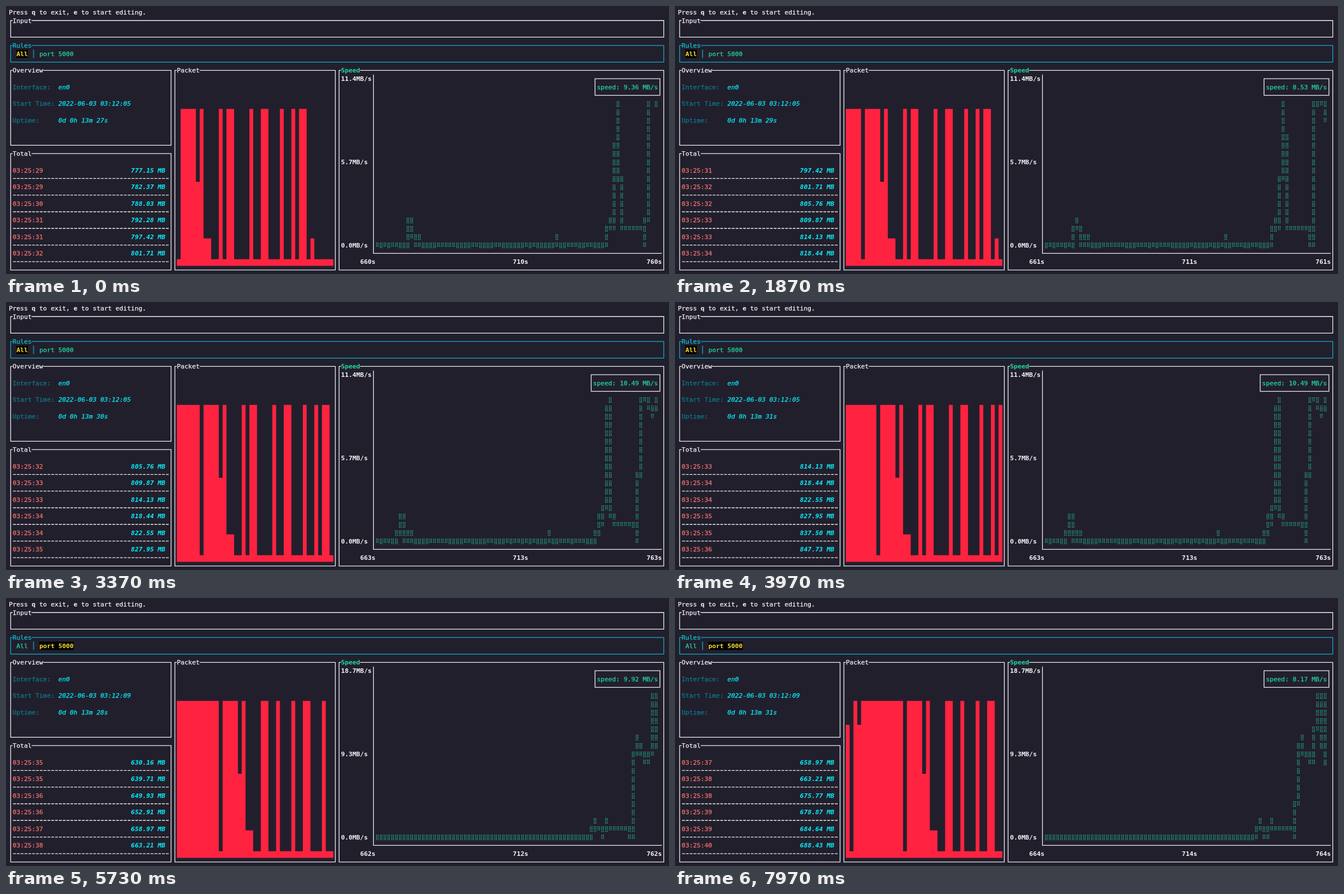
An HTML page for the animation above (8 s loop, 1177x476 px).

```html
<!DOCTYPE html>
<html lang="en">
<head>
<meta charset="utf-8">
<title>Packet monitor</title>
<style>
  html, body { margin: 0; width: 100%; height: 100%; overflow: hidden; background: #221f2d; }
  svg { display: block; width: 1177px; height: 476px; }
  text {
    font: 11.26px "DejaVu Sans Mono", monospace; white-space: pre;
    color: #f4f4f6; fill: currentColor; stroke: currentColor; stroke-width: .25;
  }
  .b { font-weight: bold; stroke-width: 0; }
  .i { font-style: italic; }
  .green { color: #21d9a4; }
  .cyan { color: #0cc6d8; }
  .label { color: #0a7c8b; }
  .value { color: #08effa; }
  .time { color: #f8726c; }
  .on { color: #fbdd33; }
  .line { fill: none; stroke: #ececef; stroke-width: 1.3; }
  .rules { stroke: #10aebf; }
  .dash { stroke-dasharray: 5 1.78; }
  .bars { fill: #ff2340; }
  .dots { fill: #21d3a0; }
  .bg { fill: #221f2d; }
  .black { fill: #000; }
</style>
</head>
<body>
<svg id="screen" viewBox="0 0 1177 476"></svg>
<script>
const LOOP = 8000, SWITCH = 5100, TICK = 535, STEP = 1042;
const CW = 6.78, RH = 14.77;
const X = col => 4.9 + col * CW;
const Y = row => 11 + row * RH;
const MX = col => X(col + .5);

// Terminal drawing helpers, all in columns and rows
const text = (c, r, s, cls = '') =>
  `<text x="${X(c)}" y="${Y(r) + 4}" class="${cls}">${s}</text>`;
const patch = (c, r, n, cls = 'bg') =>
  `<rect x="${X(c)}" y="${Y(r) - RH / 2}" width="${n * CW}" height="${RH}" class="${cls}"/>`;
const path = (d, cls = '') => `<path d="${d}" class="line ${cls}"/>`;
const frame = (c0, r0, c1, r1, cls) =>
  path(`M${MX(c0)} ${Y(r0)}H${MX(c1)}V${Y(r1)}H${MX(c0)}Z`, cls);
const box = (c0, r0, c1, r1, title, cls = '', lineCls = '') =>
  frame(c0, r0, c1, r1, lineCls) + patch(c0 + 1, r0, title.length) + text(c0 + 1, r0, title, cls);

// Packet sizes, newest first: full, medium, half, brief, tiny; height in rows
const HEIGHT = { F: 18.87, m: 16, h: 10.1, b: 3.3, '.': .8 };
const recent = 'm.Fm' + 'F'.repeat(11) + '.FFFFhF';
const allPackets = recent + 'bb..F.FF....F..FF...F..F.FF.b.....';
const portPackets = recent + 'bb..FF..F...F..FF...F...';

// MB received at each tick, from five ticks before the start
const received = [
  777.15, 782.37, 788.03, 792.28, 797.42, 801.71, 805.76, 809.87, 814.13, 818.44, 822.55,
  827.954, 837.504, 847.726, 850.706, 856.766, 861.006, 873.566, 876.666, 882.436, 886.226
];

// MB/s by second: what the port carries, and what else is on the wire
const noise = t => { const v = Math.sin(t * 127.1) * 43758.5; return v - Math.floor(v); };
const run = (start, ...vals) => t => vals[t - start] ?? 0;
const onset = run(742, .8, 1.85, 1.3, 1.3, .5, 1.8);
const burst = run(756, .35, 9, 10.9, 9.8, 9.36, 8.53, 8.75, 10.49, 18.68, 9.92, 15.93, 8.17);
const bump = run(672, 1.55, 1.8, .5, .5, .65);
const blip = run(724, .5, .55);
const spike = run(745, 4.75, 10.8);
const portSpeed = t => t > 747 && t < 756 ? 1.25 : onset(t) + burst(t);
const allSpeed = t => Math.max(portSpeed(t), bump(t) + blip(t) + spike(t), .4 * noise(t));
const between = (f, t) => {
  const a = Math.floor(t);
  return f(a) + (f(a + 1) - f(a)) * (t - a);
};

// The port tab started later, so its clock and its sum lag behind
const tabs = [
  { packets: allPackets, speed: allSpeed, offset: 0, lag: 0, start: 5, phase: 0, base: 760 },
  { packets: portPackets, speed: portSpeed, offset: 197.796, lag: 3, start: 9.05, phase: 4288, base: 661 + 100 }
];
const clock = n => 32.125 + n * TICK / 1000;

function rules(active) {
  const item = (c, s, on) => (on ? patch(c, 5, s.length, 'black') : '') + text(c, 5, s, on ? 'on b' : 'green');
  return item(2, 'All', !active) + item(8, 'port 5000', active) +
    path(`M${MX(6)} ${Y(4.5)}V${Y(5.5)}`, 'rules');
}

function overview(tab, n) {
  return [
    ['Interface:', 'en0'],
    ['Start Time:', '2022-06-03 03:12:0' + Math.floor(tab.start)],
    ['Uptime:', `0d 0h 13m ${Math.floor(clock(n) - tab.start)}s`]
  ].map(([k, v], i) => text(1, 9 + 2 * i, k, 'label') + text(13, 9 + 2 * i, v, 'value i')).join('');
}

function totals(tab, n) {
  let out = '';
  for (let i = 0; i < 6; i++) {
    const r = 19 + 2 * i;
    out += text(1, r, '03:25:' + Math.floor(clock(n - 5 + i)), 'time') +
      text(32, r, (received[n + i] - tab.offset).toFixed(2) + ' MB', 'value b i') +
      path(`M${X(1) + .9} ${Y(r + 1)}H${X(42)}`, 'dash');
  }
  return out;
}

function bars(tab, n) {
  const from = 15 - n, floor = Y(30.5);
  let d = `M${X(44)} ${floor}`;
  [...tab.packets.slice(from, from + 41)].forEach((p, i) => d += `V${floor - HEIGHT[p] * RH}H${X(45 + i)}`);
  return `<path d="${d}V${floor}Z" class="bars"/>`;
}

// One braille cell, with its lowest dots missing when short
function cell(col, row, short) {
  let d = '';
  for (let j = 0; j < (short ? 3 : 4); j++)
    for (const dx of [-1.45, 1.45])
      d += `M${(MX(col) + dx - .7).toFixed(1)} ${(Y(row) - 4 + j * 2.7).toFixed(1)}h1.4v1.4h-1.4z`;
  return d;
}

function chart(tab, step) {
  const now = tab.base + step, end = now + tab.lag;
  const max = end < 764 ? 11.4 : 18.7;
  const legend = `speed: ${portSpeed(end).toFixed(2)} MB/s`, left = 169 - legend.length;
  const span = 100 / 74;
  let d = '';
  for (let c = 0; c < 74; c++) {
    const a = end - 99.77 + c * span, b = Math.min(end, a + span);
    const times = [a, b];
    for (let t = Math.ceil(a); t < b; t++) times.push(t);
    const hs = times.map(t => between(tab.speed, t) * 21 / max);
    const lo = Math.min(...hs), hi = Math.max(...hs);
    const bottom = 28 - Math.floor(lo);
    for (let r = Math.max(8, 28 - Math.floor(hi)); r <= bottom; r++)
      if (r > 10 || c + 96 < left) d += cell(c + 96, r, r === bottom && lo % 1 >= .25);
  }
  return `<path d="${d}" class="dots"/>` +
    path(`M${MX(95)} ${Y(7.5)}V${Y(29)}H${X(171)}`) +
    [max, max / 2, 0].map((v, i) => text(87, 8 + 10 * i, v.toFixed(1) + 'MB/s', 'b')).join('') +
    [92, 132, 167].map((c, i) => text(c, 30, now - 100 + 50 * i + 's', 'b')).join('') +
    frame(left, 8, 170, 10) + text(left + 1, 9, legend, 'green');
}

const shell =
  text(0, 0, 'Press <tspan class="b">q</tspan> to exit, <tspan class="b">e</tspan> to start editing.') +
  box(0, 1, 171, 3, 'Input') + box(0, 4, 171, 6, 'Rules', 'cyan', 'rules') +
  box(0, 7, 42, 16, 'Overview') + box(0, 17, 42, 31, 'Total') +
  box(43, 7, 85, 31, 'Packet') + box(86, 7, 171, 31, 'Speed', 'green b');

const screen = document.getElementById('screen');
let shown = '';
function draw() {
  const t = performance.now() % LOOP;
  const active = t < SWITCH ? 0 : 1, tab = tabs[active];
  const n = Math.floor((t + 325) / TICK);
  const step = Math.floor((t - tab.phase) / STEP);
  const key = [active, n, step].join();
  if (key !== shown) {
    shown = key;
    screen.innerHTML = shell + rules(active) + overview(tab, n) + totals(tab, n) +
      bars(tab, n) + chart(tab, step);
  }
  requestAnimationFrame(draw);
}
draw();
</script>
</body>
</html>
```
